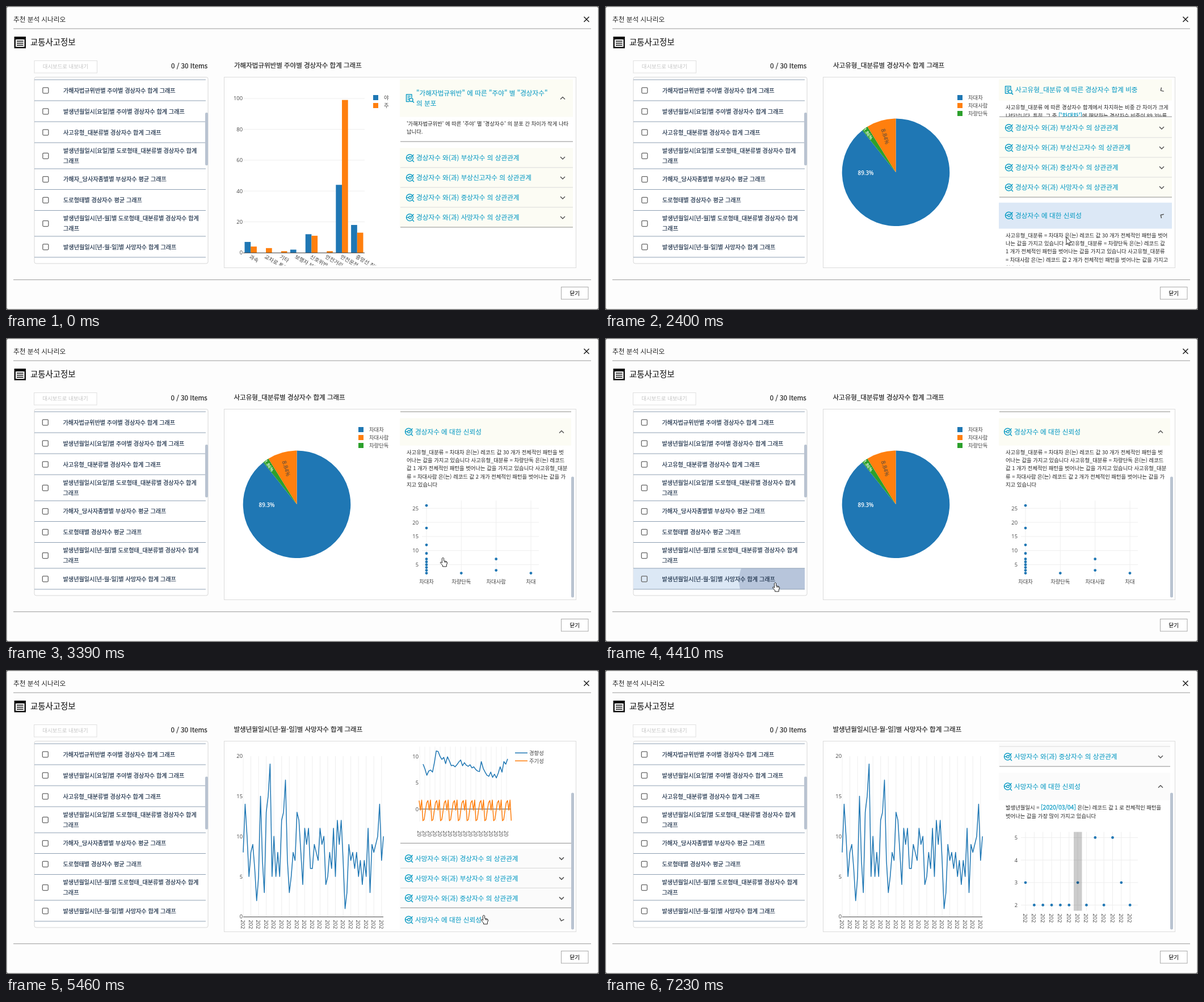
Animation of 1045x536 px, one loop 7.65 s. Source, as an HTML page:

```html
<!DOCTYPE html>
<html lang="ko">
<head>
<meta charset="utf-8">
<title>추천 분석 시나리오</title>
<style>
html, body { margin: 0; width: 100%; height: 100%; overflow: hidden; background: #fdfdfd; }
svg { display: block; }
text { font-family: "Noto Sans CJK KR", "Noto Sans CJK", "Noto Sans KR", sans-serif; fill: #222; white-space: pre; }
.plot text { font-family: "Open Sans", "Noto Sans CJK KR", "Noto Sans CJK", sans-serif; fill: #444; }
.plot .tip { font-family: "Liberation Sans", Arial, sans-serif; fill: #fff; }
.plot .white { fill: #fff; font-weight: 600; }
.mid { font-weight: 500; stroke: #222; stroke-width: .22; }
.row { fill: #1c3049; font-weight: 500; stroke: #1c3049; stroke-width: .22; }
.cyan { fill: #159fc6; font-weight: 500; stroke: #159fc6; stroke-width: .3; }
.head { fill: #159fc6; font-weight: 500; stroke: #159fc6; stroke-width: .12; }
.off { fill: #c4c4c4; }
</style>
</head>
<body>
<svg id="stage" width="1045" height="536" viewBox="0 0 1045 536"></svg>
<script>
const LOOP = 7650, BLUE = '#1f77b4', ORANGE = '#ff7f0e', GREEN = '#2ca02c', CYAN = '#159fc6';

// ---- markup helpers ----
const text = (x, mid, size, s, attr = '') =>
  `<text x="${x}" y="${(mid + size * .37).toFixed(2)}" font-size="${size}" ${attr}>${s}</text>`;
const rect = (x, y, w, h, fill, attr = '') =>
  `<rect x="${x}" y="${y}" width="${w}" height="${h}" fill="${fill}" ${attr}/>`;
const line = (x1, y1, x2, y2, color, w = 1) =>
  `<path d="M${x1} ${y1}L${x2} ${y2}" stroke="${color}" stroke-width="${w}" fill="none"/>`;
const path = (d, color, w = 1, fill = 'none') =>
  `<path d="${d}" stroke="${color}" stroke-width="${w}" fill="${fill}" stroke-linejoin="round"/>`;
const poly = (pts, color, w) => path('M' + pts.map(p => p.map(v => v.toFixed(1)).join(' ')).join('L'), color, w);
const dot = (x, y, fill = BLUE) => `<circle cx="${x}" cy="${y}" r="2.4" fill="${fill}"/>`;
const tick = (x, y, s) => text(x, y, 9.33, s, 'text-anchor="end"');
const turned = (x, y, s, deg = 90) => `<g transform="translate(${x} ${y}) rotate(${deg})">${text(0, 0, 9.33, s)}</g>`;
const range = n => [...Array(n).keys()];
const legend = (x, y, names, tx) => names.map((n, i) =>
  rect(x, y + i * 14, 9, 9, [BLUE, ORANGE, GREEN][i]) + text(tx, y + 4.5 + i * 14, 9.33, n)).join('');
const lines = (x, y, step, list) => list.map((s, i) => text(x, y + i * step, 9.35, s)).join('');

// ---- main charts ----
function barChart() {
  const step = 26.8, px = 2.72, w = 10.7;
  const night = [7, 0, 0, 2, 12, 0, 44, 18], day = [4, 3, 1, 0, 11, 1, 99, 13];
  const names = ['과속', '교차로 통행', '기타', '보행자 보호', '신호위반', '안전거리', '안전운전', '중앙선 침범'];
  let s = '';
  for (const v of [0, 20, 40, 60, 80, 100]) s += line(418, 435 - v * px, 632, 435 - v * px, '#eee') + tick(417, 435 - v * px, v);
  names.forEach((n, i) => {
    const x = 420.5 + i * step;
    s += rect(x, 435 - night[i] * px, w, night[i] * px, BLUE) + rect(x + w, 435 - day[i] * px, w, day[i] * px, ORANGE);
    s += turned(x + 9, 441, n, 30);
  });
  return s + line(418, 435.3, 632, 435.3, '#444') + legend(647, 157, ['야', '주'], 666);
}

function pieChart() {
  const cx = 512.5, cy = 293.3, r = 94.8;
  const at = f => `${cx + r * Math.sin(f * 2 * Math.PI)} ${cy - r * Math.cos(f * 2 * Math.PI)}`;
  const slice = (a, b, c) => `<path d="M${cx} ${cy}L${at(a)}A${r} ${r} 0 ${+(b - a > .5)} 1 ${at(b)}Z" fill="${c}"/>`;
  const label = (x, y, deg, s, size, cls) =>
    `<g transform="translate(${x} ${y}) rotate(${deg})">${text(0, 0, size, s, `text-anchor="middle" class="${cls}"`)}</g>`;
  return slice(0, .893, BLUE) + slice(.893, .9116, GREEN) + slice(.9116, 1, ORANGE) +
    label(459.5, 294, 0, '89.3%', 9.8, 'white') + label(494, 230, 74, '8.84%', 10, '') +
    label(463.5, 225, 54, '1.86%', 8, 'white') + legend(621, 157, ['차대차', '차대사람', '차량단독'], 640);
}

function lineChart() {
  const px = 14.17, step = 3.386;
  const vals = [8, 14, 10, 5, 8, 9, 6, 2, 5, 15, 7, 3, 13, 15, 19, 5, 10, 5, 8, 5, 12, 13, 17, 7, 3, 5, 8, 7, 13, 12, 8, 4,
    11, 9, 11, 6, 6, 9, 8, 7, 11, 9, 10, 4, 5, 8, 6, 11, 5, 12, 9, 12, 7, 1, 3, 9, 7, 8, 6, 8, 5, 7, 4, 7, 5, 11, 3, 9, 8, 9, 10, 14, 7, 10];
  let s = '';
  for (const i of range(19)) s += line(418 + i * 4 * step, 152, 418 + i * 4 * step, 435, '#eee') + turned(417.5 + i * 4 * step, 440.5, '202');
  for (const v of [0, 5, 10, 15, 20]) s += tick(417, 435 - v * px, v);
  return s + line(418, 435.3, 665, 435.3, '#444') + poly(vals.map((v, i) => [418 + i * step, 435 - v * px]), BLUE, 1.5);
}

const loader = rect(389, 129, 305, 328, '#f0f0f0') +
  `<g stroke-linecap="round">` +
  path('M537 238.500A57.500 57.500 0 1 0 578 336.500L537 296Z', '#cdcdcd', 5) +
  path('M546 234V291.500H603.500A57.500 57.500 0 0 0 546 234Z', '#cdcdcd', 5) +
  path('M551 298H604A56 56 0 0 1 588.500 335Z', '#cdcdcd', 5) + '</g>' +
  `<path id="spin" d="M12 -4A12.600 12.600 0 0 1 12 4" stroke="${CYAN}" stroke-width="2.600" fill="none"/>`;

// ---- charts inside the panels (y measured from the body top) ----
function groupScatter() {
  const y = v => 235 - v * 4.97, xs = [741, 802.3, 863.7, 925];
  const vals = [[26, 18, 12, 9, 7, 6, 5, 4, 3, 2], [2], [7, 3], [2]];
  let s = '';
  for (const v of [5, 10, 15, 20, 25]) s += line(733, y(v), 939, y(v), '#eee') + tick(727, y(v), v);
  xs.forEach((x, i) => {
    s += line(x, 97, x, 231, '#eee') + text(x, 240, 9.33, ['차대차', '차량단독', '차대사람', '차대'][i], 'text-anchor="middle"');
    s += vals[i].map(v => dot(x, y(v))).join('');
  });
  return `<g class="plot">${s}</g>`;
}

function dayScatter() {
  const y = v => 264.300 - v * 39.67, vals = [3, 2, 2, 2, 2, 2, 3, 2, 5, 2, 5, 3, 2];
  let s = '';
  for (const v of [2, 3, 4, 5]) s += line(733, y(v), 939, y(v), '#eee') + tick(727, y(v), v);
  vals.forEach((v, i) => {
    const x = 741 + i * 15.35;
    s += line(x, 56, x, 195, '#eee') + turned(x - .5, 200, '202') + dot(x, y(v));
  });
  s += `<g id="band">${rect(826, 56, 14.5, 139, '#000', 'opacity=".2"')}</g>`;
  s += `<g id="dayTip">${path('M835.500 145.300l6 -5v-2.500h9v15h-9v-2.500z', BLUE, .5, BLUE)}` +
    text(843, 145.3, 10.1, '3', 'class="tip"') +
    path('M763 199h66l4 -4 4 4h66v16h-140z', '#444', .5, '#444') +
    text(833, 207, 9.5, '2020/03/02 15:00:00.000000000', 'class="tip" text-anchor="middle"') + '</g>';
  return `<g class="plot">${s}</g>`;
}

function trendChart() {
  const y = v => 166 - v * 9.3, step = 2.225;
  const trend = [8.5, 7.6, 6.4, 7.2, 7.4, 7, 8.8, 11, 10.9, 10, 9.4, 9.8, 8.6, 9.9, 9.1, 8.2, 8.3, 8, 8.4, 8.9, 9.3, 8.2, 8.8, 8.3, 8.1, 8.4,
    7.8, 8, 7.5, 7.2, 7.1, 9, 7.7, 7, 6.4, 6.2, 7, 6, 6.6, 5.9, 6.8, 8, 7, 9, 8.5, 9.5];
  const week = [1.6, -.2, 1.7, -2.2, -2, -.3, 1.2];
  let s = '';
  for (const i of range(18)) s += line(729 + i * 9, 56, 729 + i * 9, 188, '#f0f0f0') + turned(728.5 + i * 9, 204, '20');
  for (const v of [0, 5, 10]) s += tick(727, y(v), v);
  s += line(728, y(0), 890, y(0), '#444');
  s += poly(trend.map((v, i) => [735 + i * 149 / (trend.length - 1), y(v)]), BLUE, 1.5);
  s += poly(range(74).map(i => [728 + i * step, y(week[i % 7])]), ORANGE, 1.5);
  ['경향성', '주기성'].forEach((n, i) => s += line(897, 67 + i * 14, 919, 67 + i * 14, [BLUE, ORANGE][i], 1.5) + text(922, 67 + i * 14, 9.33, n));
  s += `<g id="trendTip">` + path('M754 63l6 -5v-2h13v14h-13v-2z', BLUE, .5, BLUE) + text(761, 63, 10.1, '11', 'class="tip" font-weight="700"') +
    text(776, 63, 10, '경향성', `style="fill:${BLUE}"`) +
    path('M754 163l5 -5v-2h49v14h-49v-2z', '#444', .8, ORANGE) + text(762, 163, 10.1, '0.792517', 'class="tip" style="fill:#444"') +
    rect(809, 156, 31, 14, '#fff', 'opacity=".8"') + text(811, 163, 10, '주기성', `style="fill:${ORANGE}"`) +
    path('M725 199h25.500l4 -4 4 4h25.500v14.500h-59z', '#444', .5, '#444') +
    text(754.5, 206.3, 10.1, "'2020-01-13'", 'class="tip" text-anchor="middle"') + '</g>';
  return `<g class="plot">${s}</g>`;
}

// ---- insight panels ----
const em = s => `<tspan class="cyan" font-size="10.500">${s}</tspan>`;
const rel = (a, b) => ({ title: [`${a} 와(과) ${b} 의 상관관계`], size: 0, body: '' });
const others = ['부상자수', '부상신고자수', '중상자수', '사망자수'].map(b => rel('경상자수', b));
const outlierWide = ['사고유형_대분류 = 차대차 은(는) 레코드 값 30 개가 전체적인 패턴을 벗어',
  '나는 값을 가지고 있습니다 사고유형_대분류 = 차량단독 은(는) 레코드 값', '1 개가 전체적인 패턴을 벗어나는 값을 가지고 있습니다 사고유형_대분류',
  '= 차대사람 은(는) 레코드 값 2 개가 전체적인 패턴을 벗어나는 값을 가지고', '있습니다'];
const outlierNarrow = ['사고유형_대분류 = 차대차 은(는) 레코드 값 30 개가 전체적인 패턴을 벗',
  '어나는 값을 가지고 있습니다 사고유형_대분류 = 차량단독 은(는) 레코드', '값 1 개가 전체적인 패턴을 벗어나는 값을 가지고 있습니다 사고유형_대분',
  '류 = 차대사람 은(는) 레코드 값 2 개가 전체적인 패턴을 벗어나는 값을 가', '지고 있습니다'];

const scenes = [
  { name: '가해자법규위반별 주야별 경상자수 합계 그래프', chart: barChart(), tint: '#fcfcf4', panels: [
    { title: ['"가해자법규위반" 에 따른 "주야" 별 "경상자수"', '의 분포'], size: 44,
      body: lines(706, 12, 14, ["'가해자법규위반' 에 따른 '주야' 별 '경상자수' 의 분포 간 차이가 작게 나타", '납니다.']) },
    ...others] },
  { name: '사고유형_대분류별 경상자수 합계 그래프', chart: pieChart(), tint: '#fcfcf4', panels: [
    { title: ['사고유형_대분류 에 따른 경상자수 합계 비중'], size: 61,
      body: lines(706, 12, 15, ['사고유형_대분류 에 따른 경상자수 합계에서 차지하는 비중 간 차이가 크게',
        `나타납니다. 특히, 그 중 ${em("['차대차']")}에 해당하는 경상자수 비중이 89.3%를`, '차지합니다.']) },
    ...others,
    { title: ['경상자수 에 대한 신뢰성'], size: 271,
      body: `<g id="wide">${lines(706, 12, 14.2, outlierWide)}</g><g id="narrow">${lines(706, 12, 14.2, outlierNarrow)}</g>` + groupScatter() }] },
  { name: '발생년월일시[년-월-일]별 사망자수 합계 그래프', chart: lineChart(), tint: '#fbfbfb', panels: [
    { title: ['발생년월일시[YYYY-MM-DD] 에 따른 사망자수 의', '주기성 및 경향성'], size: 228,
      body: lines(706, 13, 14.5, [`발생년월일시${em('[YYYY-MM-DD]')} 에 따른 사망자수 합계가 다음과 같은 주`, '기성을 보입니다.']) + trendChart() },
    ...['경상자수', '부상자수', '중상자수'].map(b => rel('사망자수', b)),
    { title: ['사망자수 에 대한 신뢰성'], size: 231,
      body: lines(706, 13, 15, [`발생년월일시 = ${em('[2020/03/04]')} 은(는) 레코드 값 1 로 전체적인 패턴을`, '벗어나는 값을 가장 많이 가지고 있습니다']) + dayScatter() }] }
];

const docIcon = path('M711 6h-5.500V-6.500H715V-1M707.500 -3.500h5.500M707.500 -.5h4M707.500 2.500h3', CYAN, 1.5) +
  `<circle cx="714" cy="3" r="3" fill="none" stroke="${CYAN}" stroke-width="1.500"/>` + line(716, 5, 719, 8, CYAN, 1.7);
const ring = (x, y, r, w) => `<circle cx="${x}" cy="${y}" r="${r}" fill="none" stroke="${CYAN}" stroke-width="${w}"/>`;
const relIcon = ring(711.5, -.3, 6, 1.5) + ring(712, -.3, 2.2, 1.4) + path('M705.500 -.3h4M714 -1.500l4.500 -4.500M716 4l3 3', CYAN, 1.5);

const panelMarkup = (p, i, tint) => `<g class="panel">${rect(694, 0, 305, 35, tint)}` +
  `<g class="top">${i ? relIcon : docIcon}${p.title.map((s, k) => text(723, (k - (p.title.length - 1) / 2) * 17.5, 11.65, s, 'class="head"')).join('')}` +
  `<g class="chev">${path('M-4 -2L0 2 4 -2', '#555', 1.5)}</g></g>` +
  `<svg class="body" x="694" width="306" height="0"><g transform="translate(-694)">${p.body}</g></svg>` +
  `<path class="rule" d="M695 0H999" fill="none"/></g>`;

// ---- dialog ----
const rowEdges = [130, 167, 204, 241, 287, 323.5, 360.5, 406, 443];
const rowText = [['가해자법규위반별 주야별 경상자수 합계 그래프'], ['발생년월일시[요일]별 주야별 경상자수 합계 그래프'], ['사고유형_대분류별 경상자수 합계 그래프'],
  ['발생년월일시[요일]별 도로형태_대분류별 경상자수 합계', '그래프'], ['가해자_당사자종별별 부상자수 평균 그래프'], ['도로형태별 경상자수 평균 그래프'],
  ['발생년월일시[년-월]별 도로형태_대분류별 경상자수 합계', '그래프'], ['발생년월일시[년-월-일]별 사망자수 합계 그래프']];

function listMarkup() {
  let s = '';
  rowText.forEach((t, i) => {
    const mid = (rowEdges[i] + rowEdges[i + 1]) / 2 + .3;
    s += rect(64.8, mid - 5, 10, 10, 'none', 'rx="1.500" stroke="#666" stroke-width="1.300"');
    s += t.map((l, k) => text(101, mid + (k - (t.length - 1) / 2) * 18, 10.15, l, 'class="row"')).join('');
  });
  return s;
}

document.getElementById('stage').innerHTML =
  `<defs><clipPath id="view"><rect id="viewBox" x="694" y="129" width="305" height="328.500"/></clipPath>` +
  `<clipPath id="plotView"><rect x="388" y="129" width="306" height="328.500"/></clipPath></defs>` +
  rect(0, 0, 1045, 536, '#6a6a6a') + rect(1.5, 1.5, 1042, 533, '#fdfdfd', 'rx="3"') +
  text(13, 24, 11.65, '추천 분석 시나리오') + path('M1018.500 19l9 9m0 -9l-9 9', '#222', 1.6) +
  line(13, 40, 1031, 40, '#999') + line(13, 482.7, 1031, 482.7, '#999') +
  rect(14.5, 54, 20.5, 20.5, '#111') + rect(17, 59, 15.5, 13, '#fff') +
  [62, 65.6, 69.2].map(y => line(19, y, 30.5, y, '#111', 1.6)).join('') + text(43, 64, 14.4, '교통사고정보', 'class="mid"') +
  rect(50, 125.5, 306, 328.5, '#fff', 'rx="3" stroke="#d8d8d8"') +
  `<svg id="hover" x="50" width="302" height="37">${rect(0, 0, 302, 46, '#dce8f5')}<circle id="ripple" fill="#b7c5db"/></svg>` +
  rowEdges.map(y => line(50, y, 352, y, '#8d9fb2')).join('') + rect(351, 188, 5, 93, '#b9c3d1', 'rx="2"') +
  `<g id="soft">${rect(50, 96.5, 110.5, 21.5, '#fff', 'stroke="#e0e0e0"')}` +
  text(105, 107, 9.4, '대시보드로 내보내기', 'class="off" text-anchor="middle"') +
  text(355.3, 105.5, 11.7, '0 / 30 Items', 'class="mid" text-anchor="end"') + listMarkup() +
  scenes.map(s => text(402, 105, 11.52, s.name, 'class="mid title"')).join('') + '</g>' +
  rect(384.5, 125.5, 620, 336, '#fff', 'stroke="#dcdcdc"') +
  `<g clip-path="url(#plotView)">${scenes.map(s => `<g class="plot chart">${s.chart}</g>`).join('')}<g id="loader">${loader}</g></g>` +
  `<g clip-path="url(#view)">${scenes.map(s => `<g class="scene">${s.panels.map((p, i) => panelMarkup(p, i, s.tint)).join('')}</g>`).join('')}</g>` +
  rect(996, 129, 5, 100, '#b9c3d1', 'id="thumb" rx="2"') +
  rect(978.5, 495.5, 47.5, 21.5, '#fff', 'stroke="#aaa"') + text(1002.3, 506.3, 9.6, '닫기', 'class="mid" text-anchor="middle"') +
  `<g id="arrow">${path('M0 0V13.500L3 10.700 5 15.200 7 14.300 5 10H9.200Z', '#222', 1, '#fff')}</g>` +
  `<g id="hand">${path('M-1.600 1.500Q0 -1 1.600 1.500V6L6 7Q8 7.700 7.600 10L6.300 13V16H-.5V14L-4.600 9.500Q-4.800 7.500 -2.800 8.300L-1.600 9.500ZM3 6.500V9M5.300 7V9.500', '#222', 1, '#fff')}</g>`;

// ---- motion ----
const $ = id => document.getElementById(id);
const all = (sel, root = document) => [...root.querySelectorAll(sel)];
const show = (el, on) => el.style.display = on ? '' : 'none';
const put = (el, o) => { for (const k in o) el.setAttribute(k, o[k]); };
const clamp = v => Math.max(0, Math.min(1, v));
const prog = (t, a, b) => clamp((t - a) / (b - a));
const ease = x => x * x * (3 - 2 * x);
const between = (t, a, b) => t >= a && t < b;

// time, x, y, hand while heading on from this point
const moves = [[30, 1021, 36, 0], [240, 906, 52, 0], [390, 747, 66, 0], [510, 595, 98, 0], [600, 470, 116, 0], [690, 380, 144, 0], [780, 290, 174, 0],
  [810, 287, 180, 0], [960, 276, 223, 1], [1830, 276, 223, 0], [1950, 376, 268, 0], [2070, 598, 338, 0], [2190, 813, 407, 1], [2300, 813, 407, 0],
  [2520, 813, 407, 0], [2760, 770, 387, 1], [3420, 770, 387, 0], [3570, 598, 360, 0], [3810, 420, 402, 0], [4020, 300, 431, 1], [4550, 300, 431, 0],
  [4860, 769, 349, 1], [5130, 769, 349, 1], [5280, 842, 432, 1], [5480, 842, 432, 1], [5760, 846, 388, 1], [6990, 846, 388, 0], [7080, 925, 300, 0], [7215, 1045, 89, 0]];

function drawCursor(t) {
  const i = moves.findIndex((m, k) => k < moves.length - 1 && between(t, m[0], moves[k + 1][0]));
  show($('arrow'), i >= 0 && !moves[i][3]);
  show($('hand'), i >= 0 && moves[i][3]);
  if (i < 0) return;
  const [a, b] = [moves[i], moves[i + 1]], f = prog(t, a[0], b[0]);
  const pos = `translate(${a[1] + (b[1] - a[1]) * f} ${a[2] + (b[2] - a[2]) * f})`;
  for (const id of ['arrow', 'hand']) put($(id), { transform: pos });
}

function drawHover(t) {
  const second = t > 3000, start = second ? 4370 : 1310;
  show($('hover'), between(t, 1260, 2050) || between(t, 4320, 5100));
  put($('hover'), { y: second ? 406 : 204 });
  const grow = 1 - (1 - prog(t, start, start + 450)) ** 3.4;
  put($('ripple'), { cx: second ? 250 : 228, cy: 22, r: 230 * grow, opacity: 1 - prog(t, start + 290, start + 540) });
}

const charts = all('.chart'), titles = all('.title');
const parts = all('.scene').map(el => ({ el, panels: all('.panel', el).map(g => ({
  g, bg: g.querySelector('rect'), top: g.querySelector('.top'), chev: g.querySelector('.chev'), body: g.querySelector('.body'), rule: g.querySelector('.rule') })) }));

function drawPanels(n, head, body, scroll, slim, hot) {
  const { panels, tint } = scenes[n], last = panels.length - 1;
  let y = 129.5 - scroll;
  parts[n].panels.forEach((el, i) => {
    const p = panels[i], swaps = p.size > 0 && i === last;
    const h = i === 0 ? 1 - head : swaps ? head : 0, b = i === 0 ? 1 - body : swaps ? body : 0;
    const headH = 35 + 18 * (p.title.length - 1) + 13 * h, bodyH = p.size * b;
    if (swaps) y += 11 * h;
    put(el.g, { transform: `translate(0 ${y})` });
    put(el.bg, { height: headH, fill: swaps && hot ? '#dce8f6' : tint });
    put(el.top, { transform: `translate(${slim ? -2 : 0} ${headH / 2})` });
    put(el.chev, { transform: `translate(981 0) rotate(${90 * (h + b)})` });
    put(el.body, { y: headH, height: bodyH });
    const edge = i === last || (i === 0 && h > .05) || (i === last - 1 && panels[last].size > 0 && head > .05);
    put(el.rule, { transform: `translate(0 ${headH + bodyH - .5})`, stroke: edge ? '#8c8c8c' : '#cfcfcf' });
    y += headH + bodyH + (i === 0 ? 11 * h : 0);
  });
}

function draw(t) {
  const n = t < 1400 ? 0 : t < 4440 ? 1 : 2;
  const loading = between(t, 1400, 1800) || between(t, 4440, 4640);
  const slim = t >= 2550, swap = n === 1 ? 2234 : 5400;
  const head = n ? ease(prog(t, swap, swap + 225)) : 0, body = n ? ease(prog(t, swap + 51, swap + 276)) : 0;
  const scroll = n === 1 ? 174 * ease(prog(t, 2850, 3350))
    : n === 2 ? 117 * ease(prog(t, 5130, 5280)) - 23 * ease(prog(t, 5400, 5670)) + 23 * ease(prog(t, 6000, 6500)) : 0;

  scenes.forEach((s, i) => {
    show(titles[i], i === n);
    show(charts[i], i === n && !loading);
    show(parts[i].el, i === n);
  });
  show($('loader'), loading);
  put($('spin'), { transform: `translate(541 152) rotate(${45 + (t - 1560) * .36})` });
  put($('soft'), { transform: `translate(${slim ? -.5 : 0} 0)` });
  put($('viewBox'), { width: slim ? 302 : 305 });
  show($('wide'), !slim);
  show($('narrow'), slim);
  drawPanels(n, head, body, scroll, slim, n === 1 && between(t, 2170, 2520));

  const size = n === 1 ? 213 : 241, most = n === 1 ? 174 : 94;
  show($('thumb'), slim);
  put($('thumb'), { height: size, y: 129 + (328.5 - size) * clamp(scroll / most) });
  show($('trendTip'), between(t, 4860, 5160));
  show($('band'), t >= 5760);
  show($('dayTip'), between(t, 5760, 7040));
  drawHover(t);
  drawCursor(t);
}

const began = performance.now();
function tickFrame() {
  draw((performance.now() - began) % LOOP);
  requestAnimationFrame(tickFrame);
}
tickFrame();
</script>
</body>
</html>
```
